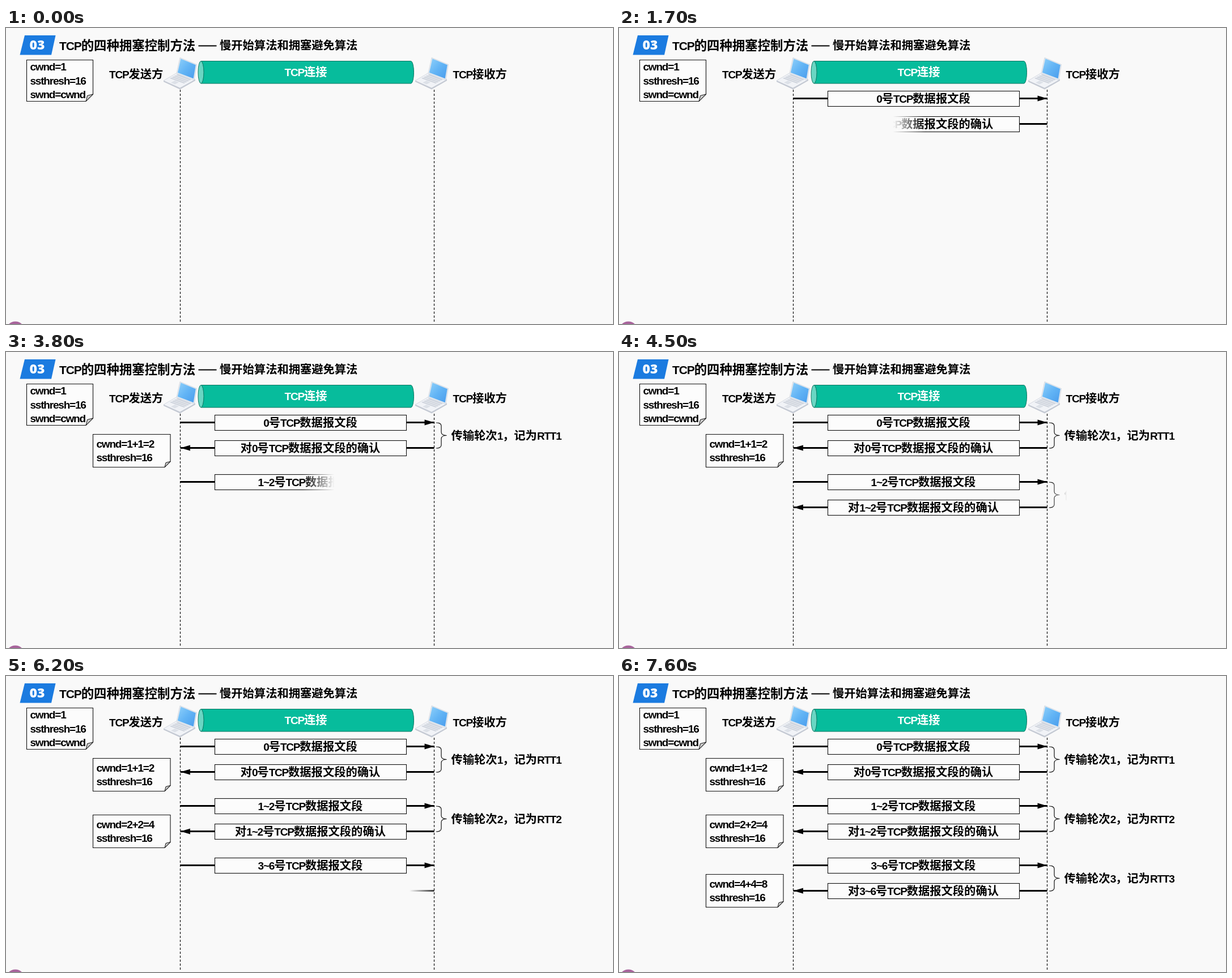
These frames come from a looping animation (1071 by 523 pixels, 8000 ms). An HTML page:

```html
<!DOCTYPE html>
<html lang="zh-CN">
<head>
<meta charset="utf-8">
<title>TCP 拥塞控制</title>
<style>
  html, body { margin: 0; width: 100%; height: 100%; overflow: hidden; background: #f9f9f9; }
  svg { display: block; width: 1071px; height: 523px; }
  text { font: 700 20.3px "Noto Sans CJK SC", "Noto Sans CJK", sans-serif; fill: #000; white-space: pre; }
  .latin { font-family: "Liberation Sans", Arial, sans-serif; font-size: 19px; letter-spacing: -1.2px; }
  .title { font-size: 22.4px; }
  .title .latin { font-size: 21px; letter-spacing: -1.1px; }
  .badge { font: 800 23px "Open Sans", sans-serif; }
  .mid { text-anchor: middle; }
  .white { fill: #fff; }
  .paper { fill: #fcfcfc; stroke: #111; stroke-width: 1.1; }
  .fold { fill: #cdcdcd; stroke: #111; stroke-width: 1; stroke-linejoin: round; }
</style>
</head>
<body>
<svg id="stage" viewBox="0 0 1071 523" xmlns="http://www.w3.org/2000/svg"></svg>
<script>
const LOOP = 8000, STEP = 100;
const LEFT = 307.5, RIGHT = 755.5, PITCH = 105, LINE = 24.5;

// Each round: [start, duration] of data, ack, brace label and note.
const rounds = [
  { seg: "0", sum: "1+1=2", times: [[880, 510], [1430, 500], [1930, 490], [2410, 470]] },
  { seg: "1~2", sum: "2+2=4", times: [[3390, 760], [4140, 330], [4460, 300], [4740, 460]] },
  { seg: "3~6", sum: "4+4=8", times: [[5710, 450], [6160, 460], [6630, 450], [7080, 480]] }
];

const label = (x, y, s, cls = "") =>
  `<text x="${x}" y="${y}" class="${cls}">${s.replace(/[!-~]+/g, '<tspan class="latin">$&</tspan>')}</text>`;

// A sheet with a folded corner and vertically centred lines.
function note(x, y, w, h, f, lines) {
  const r = x + w, b = y + h;
  const first = y + h / 2 + 6.5 - (lines.length - 1) / 2 * LINE;
  return `<path class="paper" d="M${x} ${y}H${r}V${b - f}L${r - f} ${b}H${x}Z"/>
    <path class="fold" d="M${r} ${b - f}L${r - f * .8} ${b - f * .8}L${r - f} ${b}Z"/>` +
    lines.map((s, i) => label(x + 6, first + i * LINE, s)).join("");
}

function message(y, s, toRight) {
  const tip = toRight ? RIGHT : LEFT + .5, back = toRight ? tip - 17 : tip + 17;
  const axis = y - .5;
  return `<path d="M${LEFT} ${axis}H368M707 ${axis}H${RIGHT}" stroke="#000" stroke-width="3"/>
    <path d="M${tip} ${axis}L${back} ${axis - 5}V${axis + 5}Z"/>
    <rect x="368.5" y="${y - 13.5}" width="338" height="27" fill="#fcfcfc" stroke="#111" stroke-width="1.1"/>` +
    label(537, y + 7, s, "mid");
}

function brace(y, n) {
  const a = y - 22.5, b = y + 22.5;
  return `<path d="M759 ${a}Q768 ${a} 768 ${a + 6}V${y - 6}Q768 ${y} 777.5 ${y}Q768 ${y} 768 ${y + 6}V${b - 6}Q768 ${b} 759 ${b}"
    fill="none" stroke="#111" stroke-width="1.2"/>` + label(785.5, y + 7.5, `传输轮次${n}，记为RTT${n}`);
}

const laptop = dx => `<g transform="translate(${dx} 0)" stroke-linejoin="round">
  <path d="M278 93L302 79L334 91L307 106Z" fill="#f1f3f7" stroke="#cdd2db" stroke-width=".8"/>
  <path d="M278 93L307 106L334 91V93L307 108.500L278 95Z" fill="#c3c8d2"/>
  <path d="M289 89L303 81.500L327 91L314 98Z" fill="#cfd4dd"/>
  <path d="M292 87.300L317 96.500M295.500 85.300L320.500 94.700M299 83.400L324 92.800" stroke="#f4f6f9" stroke-width=".8"/>
  <path d="M291 96.500L298 93L305 96L298 99.500Z" fill="#dde1e8"/>
  <path d="M307 52.500L336.500 64.500L332 92L301 80Z" fill="#e6ebf1" stroke="#ccd3dd" stroke-width=".8"/>
  <path d="M308.300 54.300L334.800 65.200L330.700 89.300L302.800 78.700Z" fill="url(#screen)"/>
</g>`;

const wipes = [], notes = [];
let moving = "", masks = "";

function addWipe(body, time, from, to) {
  const id = wipes.length;
  wipes.push({ time, from, to });
  masks += `<linearGradient id="grad${id}" gradientUnits="userSpaceOnUse" y1="0" y2="0">
      <stop offset="0" stop-color="#fff"/><stop offset="1" stop-color="#fff" stop-opacity="0"/></linearGradient>
    <mask id="mask${id}" maskUnits="userSpaceOnUse" x="0" y="0" width="1071" height="523">
      <rect width="1071" height="523" fill="url(#grad${id})"/></mask>`;
  moving += `<g id="wipe${id}">${body}</g>`;
}

rounds.forEach(({ seg, sum, times }, i) => {
  const y = 125 + i * PITCH, name = `${seg}号TCP数据报文段`;
  addWipe(message(y, name, true), times[0], 307, 756);
  addWipe(message(y + 45, `对${name}的确认`, false), times[1], 756, 307);
  addWipe(brace(y + 22.5, i + 1), times[2], 757, 979);
  const top = [145.5, 245.5, 350.5][i];
  moving += `<g id="note${i}">${note(153.5, top, 136.5, 58, 10, [`cwnd=${sum}`, "ssthresh=16"])}</g>`;
  notes.push({ time: times[3], cx: 221.8, cy: top + 29 });
});

document.getElementById("stage").innerHTML = `<defs>
    <linearGradient id="screen" x1="0" y1="0" x2="1" y2="1">
      <stop offset="0" stop-color="#8fd0fa"/><stop offset=".5" stop-color="#62b4f5"/><stop offset="1" stop-color="#4a9cec"/>
    </linearGradient>${masks}</defs>
  <rect width="1071" height="523" fill="#f9f9f9"/>
  <path d="M33 13H87.500L80 47.500H24.500Z" fill="#1b7be0"/>
  <text x="55" y="38" class="badge mid white">03</text>
  ${label(94, 38.5, "TCP的四种拥塞控制方法", "title")}
  <path d="M339.500 31.500H371.500" stroke="#000" stroke-width="1.8"/>
  ${label(377, 38, "慢开始算法和拥塞避免算法")}
  ${note(36.5, 56.5, 117, 73, 12.5, ["cwnd=1", "ssthresh=16", "swnd=cwnd"])}
  ${label(182, 88.5, "TCP发送方")}
  ${label(788.5, 88.5, "TCP接收方")}
  <path d="M344 58.500H714.500A5 19.750 0 0 1 714.500 98H344Z" fill="#07bc9c" stroke="#0a7561"/>
  <ellipse cx="344" cy="78.250" rx="5" ry="19.750" fill="#6ad6c3" stroke="#0a7561"/>
  ${label(529, 85, "TCP连接", "mid white")}
  <path d="M${LEFT} 109V519M${RIGHT} 109V519" stroke="#111" stroke-width="1.2" stroke-dasharray="4 3"/>
  ${laptop(0)}${laptop(444)}
  <circle cx="16.500" cy="535.500" r="17" fill="#a8649c"/>
  ${moving}`;

const el = id => document.getElementById(id);
const progress = (t, [start, length]) => Math.min(1, Math.max(0, (t - start) / length));

function draw(t) {
  wipes.forEach(({ time, from, to }, i) => {
    const p = progress(t, time), g = el("wipe" + i), grad = el("grad" + i);
    const edge = (to - from) / 8, lead = from + p * (to - from + edge);
    g.setAttribute("visibility", p > 0 ? "visible" : "hidden");
    g.setAttribute("mask", p < 1 ? `url(#mask${i})` : "none");
    grad.setAttribute("x1", lead - edge);
    grad.setAttribute("x2", lead);
  });
  notes.forEach(({ time, cx, cy }, i) => {
    const p = progress(t, time), g = el("note" + i), size = Math.min(1, 1.4 * p);
    g.setAttribute("visibility", p > 0 ? "visible" : "hidden");
    g.setAttribute("opacity", p);
    g.setAttribute("transform",
      `translate(${cx} ${cy}) rotate(${-90 * (1 - p)}) scale(${size}) translate(${-cx} ${-cy})`);
  });
}

const begin = performance.now();
function tick() {
  const t = (performance.now() - begin) % LOOP;
  draw(Math.floor(t / STEP) * STEP);
  requestAnimationFrame(tick);
}
tick();
</script>
</body>
</html>
```
